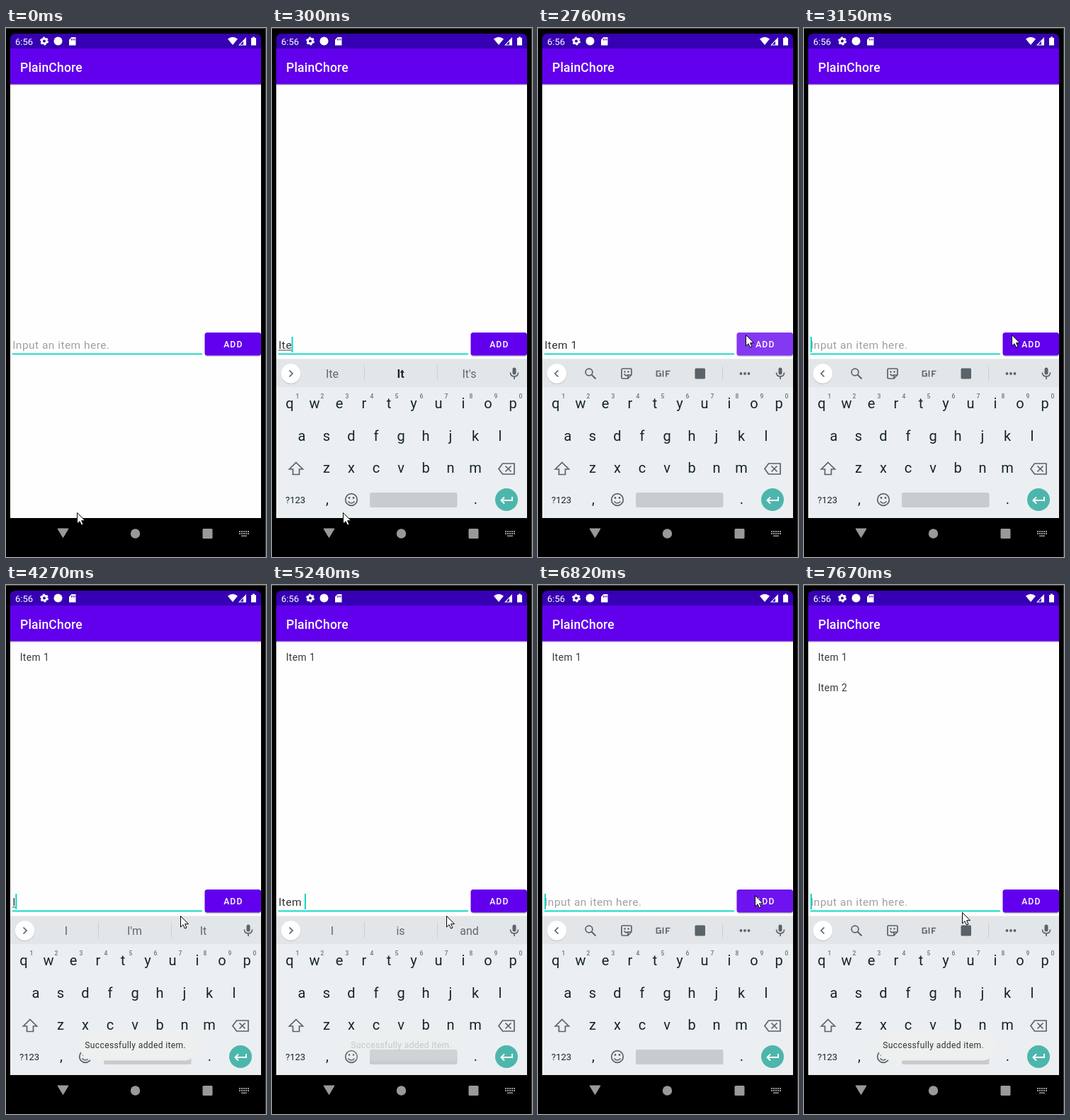
Animation of 367 by 747 pixels, one loop 8 s. Source, as an HTML page:

```html
<!DOCTYPE html>
<html lang="en">
<head>
<meta charset="utf-8">
<title>Todo list demo</title>
<style>
  html, body { margin: 0; width: 100%; height: 100%; overflow: hidden; background: #000; }
  svg { display: block; font-family: Roboto, sans-serif; }
  text { white-space: pre; }
  .mid { text-anchor: middle; }
  .line { fill: none; stroke: #5a6369; stroke-width: 1.7; }
  .icon { fill: #5a6369; }
  #keys { fill: #15252b; font-size: 20px; }
  #keys .hint { fill: #6a747a; font-size: 8.5px; font-weight: 500; }
  #chips { fill: #5f686d; font-size: 16px; }
  .item { fill: #373737; font-size: 13.8px; letter-spacing: .43px; }
  #entry { font-size: 15.5px; letter-spacing: .465px; }
</style>
</head>
<body>
<svg width="367" height="747" viewBox="0 0 367 747">
  <rect width="367" height="747"/>
  <path d="M0 .5H366.5V747" fill="none" stroke="#444"/>

  <!-- App screen -->
  <rect x="6" y="29" width="354" height="663" fill="#fefefe"/>
  <path d="M6 30V16Q6 8 14 8H352Q360 8 360 16V30Z" fill="#3700b3"/>
  <rect x="6" y="79" width="354" height="2" fill="#000" opacity=".18"/>
  <rect x="6" y="29" width="354" height="50.5" fill="#6200ee"/>
  <g fill="#fff">
    <text x="13" y="23.5" font-size="13">6:56</text>
    <circle cx="54" cy="18.5" r="3.4" fill="none" stroke="#fff" stroke-width="2.8"/>
    <circle cx="54" cy="18.5" r="5.2" fill="none" stroke="#fff" stroke-width="1.6" stroke-dasharray="2.9 2.545"/>
    <circle cx="73.5" cy="18.5" r="6"/>
    <path d="M92.5 13H98.5V24.5H89V16.5Z"/>
    <path d="M92.5 15V17.5M94.7 15V17.5M96.9 15V17.5" stroke="#3700b3"/>
    <path d="M313 15.5Q320 10 327 15.5L320 24Z"/>
    <path d="M328 24.5L339 13V24.5Z"/>
    <path d="M330.5 23.5L335 18.8V23.5Z" fill="#3700b3"/>
    <path d="M346 14H348V12.5H351V14H353V24.5H346Z"/>
    <text x="20" y="62" font-size="17.5" font-weight="500" letter-spacing=".2">PlainChore</text>
  </g>
  <text class="item" x="19.7" y="107">Item 1</text>
  <text class="item" x="19.7" y="150">Item 2</text>

  <!-- Input row -->
  <text id="entry" x="9.2" y="453"></text>
  <rect id="composing" x="9" y="454.5" height="1" fill="#444"/>
  <rect x="9" y="459.5" width="268" height="1.8" fill="#03d5c3"/>
  <rect id="caret" y="436" width="1.9" height="22" fill="#03d5c3"/>
  <rect x="281" y="431.5" width="79" height="32.5" rx="3.5" opacity=".2"/>
  <rect x="280.5" y="430" width="79.5" height="32.5" rx="3.5" fill="#6200ee"/>
  <rect id="ripple" x="280.5" y="430" width="79.5" height="32.5" rx="3.5" fill="#fff"/>
  <text class="mid" x="320.8" y="451" fill="#fff" font-size="12.2" font-weight="500" letter-spacing="1.1">ADD</text>

  <!-- Keyboard -->
  <g id="keyboard">
    <rect x="6" y="467.5" width="354" height="224.5" fill="#ebeff1"/>
    <rect x="6" y="467.5" width="354" height="39.5" fill="#e2e6e9"/>
    <circle cx="26.5" cy="489" r="14" opacity=".12"/>
    <circle cx="26.5" cy="488" r="13.7" fill="#fff"/>
    <path id="chevron" class="line"/>
    <g id="chips">
      <text class="mid" x="85" y="494"></text>
      <text class="mid" x="181.5" y="494"></text>
      <text class="mid" x="278.5" y="494"></text>
      <path d="M130.5 476V498M233.5 476V498" stroke="#cbd0d4"/>
    </g>
    <g id="tools">
      <g class="line">
        <circle cx="72" cy="486" r="4.9"/>
        <path d="M75.5 489.5L81.5 495.5" stroke-width="2"/>
        <path d="M119.500 481H130.500Q132 481 132 482.500V489.500L127 495H119.500Q118 495 118 493.500V482.500Q118 481 119.500 481ZM127 495V490H132M121.500 488.500Q124 492 126.500 490"/>
      </g>
      <g class="icon">
        <circle cx="122.500" cy="485.500" r="1.200"/><circle cx="127.500" cy="485.500" r="1.200"/>
        <rect x="221.5" y="480.5" width="14.500" height="15" rx="1.500"/>
        <circle cx="286.500" cy="488" r="1.900"/><circle cx="292" cy="488" r="1.900"/><circle cx="297.500" cy="488" r="1.900"/>
      </g>
      <path class="line" stroke-width="2" d="M173 484.500H167.500V491.500H173V488H170.500M176.500 483.500V492.500M181 492.500V484.500H186.500M181 488.500H185"/>
      <path d="M260.500 478V498" stroke="#cbd0d4"/>
    </g>
    <rect class="icon" x="339.500" y="479.500" width="5" height="10" rx="2.500"/>
    <path class="line" d="M336.500 486.500Q336.500 492 342 492T347.500 486.500M342 492V496"/>
    <g id="keys"></g>
    <g class="line">
      <path d="M34 613.500L43.500 623H38.500V630.500H29.500V623H24.500Z"/>
      <path d="M320 622.500L325.500 615H342V630H325.500ZM329.500 618.500L337.500 626.500M337.500 618.500L329.500 626.500"/>
      <circle cx="112" cy="666" r="8.300"/>
      <path d="M107.500 668.500Q112 673.500 116.500 668.500"/>
    </g>
    <circle class="icon" cx="109" cy="663.500" r="1.400"/><circle class="icon" cx="115" cy="663.500" r="1.400"/>
    <rect x="138" y="656" width="123.500" height="21" rx="2.500" fill="#c8ccd0"/>
    <circle cx="331" cy="666" r="16" fill="#4db6ac"/>
    <path d="M339 662V667H324M328 662.500L323.500 667L328 671.500" fill="none" stroke="#fff" stroke-width="1.900"/>
  </g>

  <!-- Navigation bar -->
  <g fill="#999">
    <path d="M73 707H88L80.500 719.500Z" stroke="#999" stroke-linejoin="round"/>
    <circle cx="182.500" cy="714" r="6.700"/>
    <rect x="277.500" y="707" width="14" height="14" rx="1.500"/>
    <path d="M329 711H343M329 714H343" stroke="#999" stroke-width="2" stroke-dasharray="2 1"/>
    <rect x="332" y="716.500" width="8" height="1.500"/>
  </g>

  <g id="toast">
    <rect x="103.500" y="628" width="168.500" height="43.500" rx="21" fill="#eeefef"/>
    <text x="111.300" y="654" font-size="12.050" letter-spacing=".37" fill="#333">Successfully added item.</text>
  </g>
  <path id="pointer" d="M.5 .5V16L4 12.700L6.500 18L9 17L6.600 11.700H11.500Z" fill="#fff" stroke="#000"/>
</svg>
<script>
const LOOP = 8000, BLINK = 470;
const $ = id => document.getElementById(id);
const [entry, composing, caret, ripple, keyboard, chevron, chips, tools, toast, pointer] =
  ['entry', 'composing', 'caret', 'ripple', 'keyboard', 'chevron', 'chips', 'tools', 'toast', 'pointer'].map($);
const items = document.querySelectorAll('.item');
const chipTexts = chips.querySelectorAll('text');

// [time, text, suggestions]; without suggestions the tool strip shows
const typing = [
  [-BLINK, ''],
  [140, 'It', ['It', "It's", 'Its']],
  [300, 'Ite', ['Ite', 'It', "It's"]],
  [570, 'Item', ['Item', 'Items', "Item's"]],
  [880, 'Item ', ['I', 'is', 'and']],
  [1250, 'Item 1'],
  [2900, ''],
  [4270, 'I', ['I', "I'm", 'It']],
  [4390, 'It', ['It', "It's", 'Its']],
  [4700, 'Ite', ['Ite', 'It', "It's"]],
  [4970, 'Item', ['Item', 'Items', "Item's"]],
  [5110, 'Item ', ['I', 'is', 'and']],
  [5390, 'Item 2'],
  [6730, '']
];

// [time, x, y]; without a position the pointer is hidden
const moves = [
  [0, 100, 684], [1680, 106, 655], [1815, 130, 545], [1950, 154, 454],
  [2070, 190, 421], [2200, 230, 414], [2340, 265, 418], [2480, 285, 428], [2620, 293, 433],
  [3420, 276, 448], [3570, 246, 467],
  [5390, 249, 430], [5520, 251, 380], [5650, 253, 340], [5780, 253, 313],
  [6020], [6330, 306, 438],
  [7100, 280, 448], [7230, 240, 459], [7360, 223, 462]
];

function label(x, y, text, extra = '') {
  return `<text class="mid ${extra}" x="${x}" y="${y}">${text}</text>`;
}
function keyRow(letters, x, y) {
  return [...letters].map((letter, i) => label(x + 35 * i, y, letter)).join('');
}
$('keys').innerHTML =
  keyRow('qwertyuiop', 25, 537) + keyRow('asdfghjkl', 42, 582.5) + keyRow('zxcvbnm', 77, 628) +
  [...'1234567890'].map((digit, i) => label(36 + 35 * i, 523, digit, 'hint')).join('') +
  '<text x="19" y="671" font-size="13">?123</text>' + label(78, 672, ',') + label(287.5, 672, '.');

const latest = (steps, t) => steps.findLast(step => step[0] <= t);
const ramp = (t, start, length) => Math.max(0, Math.min(1, (t - start) / length));
const show = (node, on) => node.setAttribute('visibility', on ? 'visible' : 'hidden');
const fade = (node, amount) => node.setAttribute('opacity', amount);

function drawEntry(t) {
  const [since, text, words] = latest(typing, t);
  entry.textContent = text || 'Input an item here.';
  entry.setAttribute('fill', text ? '#303030' : '#a0a0a0');
  const width = text ? entry.getComputedTextLength() : 0;
  caret.setAttribute('x', 9.2 + width - (text ? .5 : 0));
  show(caret, t >= 140 && Math.floor((t - since) / BLINK) % 2 === 0);
  composing.setAttribute('width', words && !text.endsWith(' ') ? width : 0);

  chevron.setAttribute('d', words ? 'M24.500 483.500L29 488L24.500 492.500' : 'M28.500 483.500L24 488L28.500 492.500');
  fade(chips, words ? 1 : 0);
  fade(tools, words ? 0 : 1);
  chipTexts.forEach((chip, i) => {
    chip.textContent = words ? words[i] : '';
    const bold = i === 1 && text === 'Ite';
    chip.setAttribute('font-weight', bold ? 700 : 400);
    chip.setAttribute('fill', bold ? '#15252b' : '#5f686d');
  });
}

function draw(t) {
  show(keyboard, t >= 140);
  drawEntry(t);

  const pressed = latest([[-LOOP], [2760], [6590]], t)[0];
  fade(ripple, .22 * (1 - ramp(t, pressed, 350)));
  fade(items[0], ramp(t, 3270, 150));
  fade(items[1], ramp(t, 7100, 150));
  fade(toast, ramp(t, 3270, 250) - ramp(t, 4970, 340) + ramp(t, 7100, 250));

  const [, x, y] = latest(moves, t);
  show(pointer, x !== undefined);
  if (x !== undefined) pointer.setAttribute('transform', `translate(${x} ${y})`);
}

const start = performance.now();
function tick() {
  draw((performance.now() - start) % LOOP);
  requestAnimationFrame(tick);
}
tick();
</script>
</body>
</html>
```
